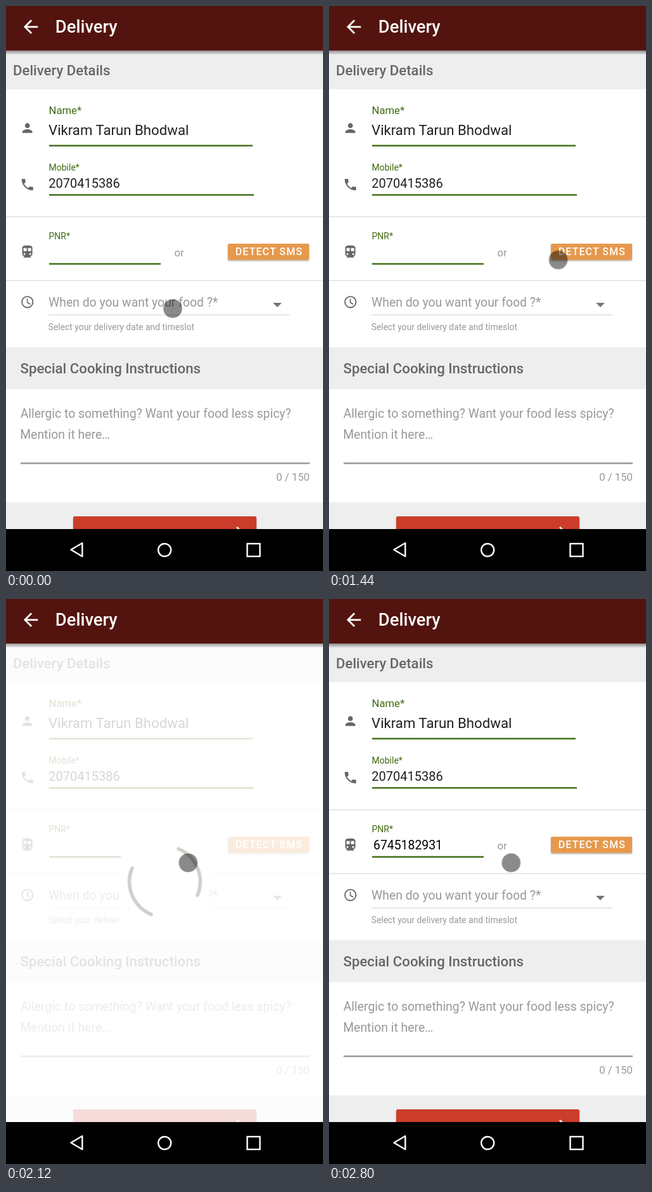
An HTML page for the animation above (3920 ms loop, 500 by 889 pixels).

```html
<!DOCTYPE html>
<html lang="en">
<head>
<meta charset="utf-8">
<title>Delivery form</title>
<style>
  html, body { margin: 0; height: 100%; overflow: hidden; background: #fff; }
  svg { display: block; width: 100%; height: 100%; font-family: Roboto, Arial, sans-serif; }
  .title { font-size: 27.4px; font-weight: 500; fill: #fff; }
  .head { font-size: 22.2px; font-weight: 500; fill: #666; }
  .label { font-size: 14px; fill: #3f6b12; }
  .hint { font-size: 19.4px; fill: #999; }
  .small { font-size: 13.9px; fill: #999; }
  .note { font-size: 16.7px; fill: #999; }
  .value { font-size: 20px; fill: #212121; }
  .band { fill: #eee; }
  .rule { fill: #ddd; }
  .field { fill: #44701a; }
  .icon { fill: #666; }

  .move, .press, .veil, .panel, .pnr, .spin { animation: 3920ms linear infinite; }
  .move { animation-name: move; }
  .press { animation-name: press; }
  .veil { animation-name: veil; }
  .panel { animation-name: panel; }
  .pnr { animation-name: pnr; }
  .spin { animation-name: spin; }

  @keyframes move {
    0% { transform: translate(263px, 476px); }
    8.06% { transform: translate(263px, 476px); animation-timing-function: steps(5, start); }
    13.16% { transform: translate(324.5px, 438px); animation-timing-function: steps(6, start); }
    19.29%, 33.57% { transform: translate(401.5px, 391px); animation-timing-function: steps(4, start); }
    37.65% { transform: translate(361.5px, 399.5px); animation-timing-function: steps(7, start); }
    44.8%, 100% { transform: translate(287.3px, 415px); }
  }
  @keyframes press {
    0% { transform: scale(1); }
    24.39% { transform: scale(1); animation-timing-function: steps(4, start); }
    28.47% { transform: scale(.7); animation-timing-function: steps(5, start); }
    33.57%, 100% { transform: scale(1); }
  }
  @keyframes veil {
    0% { opacity: 0; }
    37.65% { opacity: 0; animation-timing-function: steps(5, start); }
    42.76% { opacity: .82; }
    64.18% { opacity: .82; animation-timing-function: steps(3, start); }
    67.24%, 100% { opacity: 0; }
  }
  @keyframes panel {
    0% { opacity: 0; }
    37.65% { opacity: 0; animation-timing-function: steps(5, start); }
    42.76% { opacity: 1; }
    67.24% { opacity: 1; animation-timing-function: steps(5, start); }
    72.35%, 100% { opacity: 0; }
  }
  @keyframes pnr {
    0% { opacity: 0; }
    67.24% { opacity: 0; animation-timing-function: steps(5, start); }
    72.35%, 100% { opacity: 1; }
  }
  @keyframes spin {
    0% { transform: rotate(0deg); }
    38.67% { transform: rotate(0deg); animation-timing-function: steps(33, end); }
    72.35%, 100% { transform: rotate(247.5deg); }
  }
</style>
</head>
<body>
<svg viewBox="0 0 500 889">
  <defs>
    <linearGradient id="shade" x2="0" y2="1">
      <stop stop-opacity=".42"/>
      <stop offset="1" stop-opacity="0"/>
    </linearGradient>
    <filter id="lift" x="-5%" y="-20%" width="110%" height="150%">
      <feDropShadow dx="0" dy="1.5" stdDeviation="1.2" flood-opacity=".35"/>
    </filter>
  </defs>

  <rect width="500" height="889" fill="#fff"/>
  <rect class="band" y="70" width="500" height="61"/>
  <rect class="band" y="537" width="500" height="66"/>
  <rect class="band" y="781" width="500" height="42"/>
  <text class="head" x="11" y="108.5">Delivery Details</text>
  <text class="head" x="22.5" y="578">Special Cooking Instructions</text>

  <!-- contact -->
  <path class="icon" transform="translate(22.1 180.4) scale(.97)" d="M12 12c2.21 0 4-1.79 4-4s-1.79-4-4-4-4 1.79-4 4 1.79 4 4 4zm0 2c-2.67 0-8 1.34-8 4v2h16v-2c0-2.66-5.33-4-8-4z"/>
  <text class="label" x="67.5" y="170" style="font-size:16.7px">Name*</text>
  <text class="value" x="67" y="203" style="font-size:22.2px">Vikram Tarun Bhodwal</text>
  <rect class="field" x="68" y="218.5" width="321" height="2.5"/>
  <path class="icon" transform="translate(21.8 269)" d="M6.62 10.79c1.44 2.83 3.76 5.14 6.59 6.59l2.2-2.2c.27-.27.67-.36 1.02-.24 1.12.37 2.33.57 3.57.57.55 0 1 .45 1 1V20c0 .55-.45 1-1 1-9.39 0-17-7.61-17-17 0-.55.45-1 1-1h3.5c.55 0 1 .45 1 1 0 1.25.2 2.45.57 3.57.11.35.03.74-.25 1.02l-2.2 2.2z"/>
  <text class="label" x="67.5" y="259">Mobile*</text>
  <text class="value" x="67.3" y="285.5">2070415386</text>
  <rect class="field" x="68" y="296" width="323" height="2.5"/>
  <rect class="rule" y="331" width="500" height="1.3"/>

  <!-- booking -->
  <path class="icon" transform="translate(21.6 374.8)" d="M12 2c-4.42 0-8 .5-8 4v9.5C4 17.43 5.57 19 7.5 19L6 20.5v.5h12v-.5L16.5 19c1.93 0 3.5-1.57 3.5-3.5V6c0-3.5-3.58-4-8-4zM7.5 17c-.83 0-1.5-.67-1.5-1.5S6.67 14 7.5 14s1.5.67 1.5 1.5S8.33 17 7.5 17zm3.5-6H6V6h5v5zm5.5 6c-.83 0-1.5-.67-1.5-1.5s.67-1.5 1.5-1.5 1.5.67 1.5 1.5-.67 1.5-1.5 1.5zm1.5-6h-5V6h5v5z"/>
  <text class="label" x="67.5" y="367">PNR*</text>
  <text class="value pnr" x="70" y="394.3" style="font-size:19.4px;fill:#000">6745182931</text>
  <rect class="field" x="68" y="404.5" width="176" height="2.5"/>
  <text class="note" x="265.5" y="393.5">or</text>
  <rect x="350" y="374" width="128" height="25.5" rx="1.5" fill="#e6994e" filter="url(#lift)"/>
  <text x="361.8" y="392" fill="#fff" font-size="16" font-weight="500" letter-spacing="1.1">DETECT SMS</text>
  <rect class="rule" y="431.3" width="500" height="1.3"/>

  <!-- time slot -->
  <g fill="none" stroke="#666" stroke-width="1.9">
    <circle cx="33.8" cy="465.8" r="8.7"/>
    <path d="M33.6 460.5v6l4.6 2.8" stroke-width="1.6"/>
  </g>
  <text class="hint" x="67" y="473">When do you want your food ?*</text>
  <path fill="#757575" d="M421 467h14l-7 7z"/>
  <rect class="rule" x="67" y="485.3" width="380" height="1.4"/>
  <text class="small" x="66.7" y="510">Select your delivery date and timeslot</text>

  <!-- instructions -->
  <text class="hint" x="22.7" y="648">Allergic to something? Want your food less spicy?</text>
  <text class="hint" x="22.2" y="681.3">Mention it here…</text>
  <rect x="23" y="718.3" width="456" height="2.5" fill="#999"/>
  <text class="note" x="479" y="746.5" text-anchor="end">0 / 150</text>
  <rect x="106" y="803" width="289" height="50" rx="2.5" fill="#cb3d2b" filter="url(#lift)"/>
  <path d="M364 820l7 7" stroke="#fff" stroke-width="2.5"/>

  <!-- loading -->
  <rect class="veil" y="70" width="500" height="753" fill="#fff"/>
  <g class="panel">
    <rect x="181" y="375" width="140" height="140" fill="#fff"/>
    <g transform="translate(250.5 444.7)">
      <path class="spin" d="M-55.8 0A55.8 55.8 0 0 1 0-55.8M55.8 0A55.8 55.8 0 0 1 0 55.8" fill="none" stroke="#cfd0c9" stroke-width="5.5" stroke-linecap="round"/>
    </g>
  </g>

  <!-- bars -->
  <rect y="70" width="500" height="7" fill="url(#shade)"/>
  <rect width="500" height="70" fill="#53140f"/>
  <path fill="#fff" transform="translate(22.3 16) scale(1.4)" d="M20 11H7.83l5.59-5.59L12 4l-8 8 8 8 1.41-1.41L7.83 13H20v-2z"/>
  <text class="title" x="77.8" y="42">Delivery</text>
  <rect y="823" width="500" height="66"/>
  <g fill="none" stroke="#fff" stroke-width="2.4">
    <path d="M102.5 855.5L120.3 845v21z" stroke-linejoin="round"/>
    <circle cx="250.2" cy="856" r="10"/>
    <rect x="380.5" y="846" width="20" height="20"/>
  </g>

  <g class="move"><circle class="press" r="14.8" fill-opacity=".46"/></g>
</svg>
</body>
</html>
```
